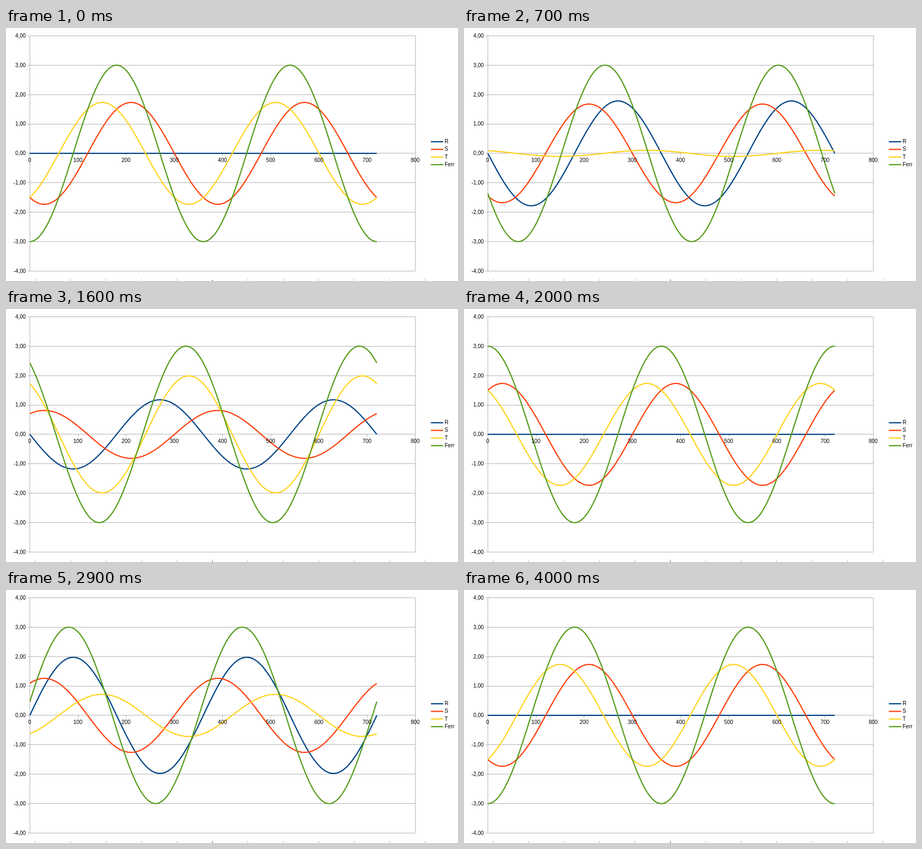
Write an HTML page that moves like this. It is 842x472 px and loops after 4.1 s.

```html
<!DOCTYPE html>
<html lang="en">
<head>
<meta charset="utf-8">
<title>Three phase waves</title>
<style>
html, body { margin: 0; width: 100%; height: 100%; overflow: hidden; background: #fff; }
svg { display: block; }
text { font: 10px "Liberation Sans", Arial, sans-serif; fill: #000; }
</style>
</head>
<body>
<svg id="stage" width="842" height="472" viewBox="0 0 842 472"></svg>
<script>
const STEP_MS = 100, STEPS = 41, STEP_DEG = 9, START_DEG = 180;
const GRAY = '#b3b3b3';
const stage = document.getElementById('stage');

const px = v => 44.4 + v * 0.8977;
const py = v => 233.9 - v * 54.875;
const crisp = v => Math.floor(v) + 0.5;
const rad = deg => deg * Math.PI / 180;

function add(tag, attrs, text) {
  const el = document.createElementNS('http://www.w3.org/2000/svg', tag);
  for (const key in attrs) el.setAttribute(key, attrs[key]);
  if (text !== undefined) el.textContent = text;
  stage.appendChild(el);
  return el;
}
const line = (x1, y1, x2, y2, stroke = GRAY, width = 1) =>
  add('line', { x1, y1, x2, y2, stroke, 'stroke-width': width });
const label = (x, y, text, anchor = 'start') =>
  add('text', { x, y, 'text-anchor': anchor }, text);

// Each coil is a standing wave; together they form a travelling one.
const coil = shift => (x, t) => 2 * Math.sin(rad(t - shift)) * Math.sin(rad(x - shift));
const series = [
  { name: 'R', color: '#004586', wave: coil(0) },
  { name: 'S', color: '#ff420e', wave: coil(120) },
  { name: 'T', color: '#ffd320', wave: coil(240) },
  { name: 'Ferr', color: '#579d1c', wave: (x, t) => 3 * Math.cos(rad(x - t)) }
];

// Grid and axes
const left = crisp(px(0)), right = crisp(px(800));
for (let v = -4; v <= 4; v++) {
  const y = crisp(py(v));
  line(left - 4, y, right, y);
}
for (const x of [left, right]) line(x, crisp(py(4)), x, crisp(py(-4)));
for (let v = 0; v <= 800; v += 100) {
  const x = crisp(px(v));
  line(x, 233.5, x, 238);
}

// Cell edges below the chart
for (let x = 54.5; x < 842; x += 66) {
  if (x !== 384.5) line(x, 468, x, 472, '#c0c0c0');
}
line(384.5, 470, 384.5, 472, '#333');
const mark = line(384.5, 468, 384.5, 469, '#333');

for (const s of series) {
  s.path = add('path', { fill: 'none', stroke: s.color, 'stroke-width': 2.25, 'stroke-linejoin': 'round' });
}

// Labels and legend
for (let v = -4; v <= 4; v++) {
  label(36.8, py(v) + 3.4, v.toFixed(2).replace('.', ','), 'end');
}
for (let v = 0; v <= 800; v += 100) label(px(v) - 0.3, 250, v, 'middle');
series.forEach((s, i) => {
  const y = 212.2 + i * 14.25;
  line(791.5, y, 814.5, y, s.color, 2.25);
  label(817, y + 2.9, s.name);
});

function draw(step) {
  const t = START_DEG + step * STEP_DEG;
  for (const s of series) {
    let d = '';
    for (let x = 0; x <= 720; x += 4) {
      d += (x ? 'L' : 'M') + px(x).toFixed(2) + ' ' + py(s.wave(x, t)).toFixed(2);
    }
    s.path.setAttribute('d', d);
  }
  mark.setAttribute('visibility', step ? 'visible' : 'hidden');
}

let shown = 0;
const origin = performance.now();
function tick() {
  const step = Math.floor(Math.max(0, performance.now() - origin) / STEP_MS) % STEPS;
  if (step !== shown) draw(shown = step);
  requestAnimationFrame(tick);
}
draw(0);
requestAnimationFrame(tick);
</script>
</body>
</html>
```
